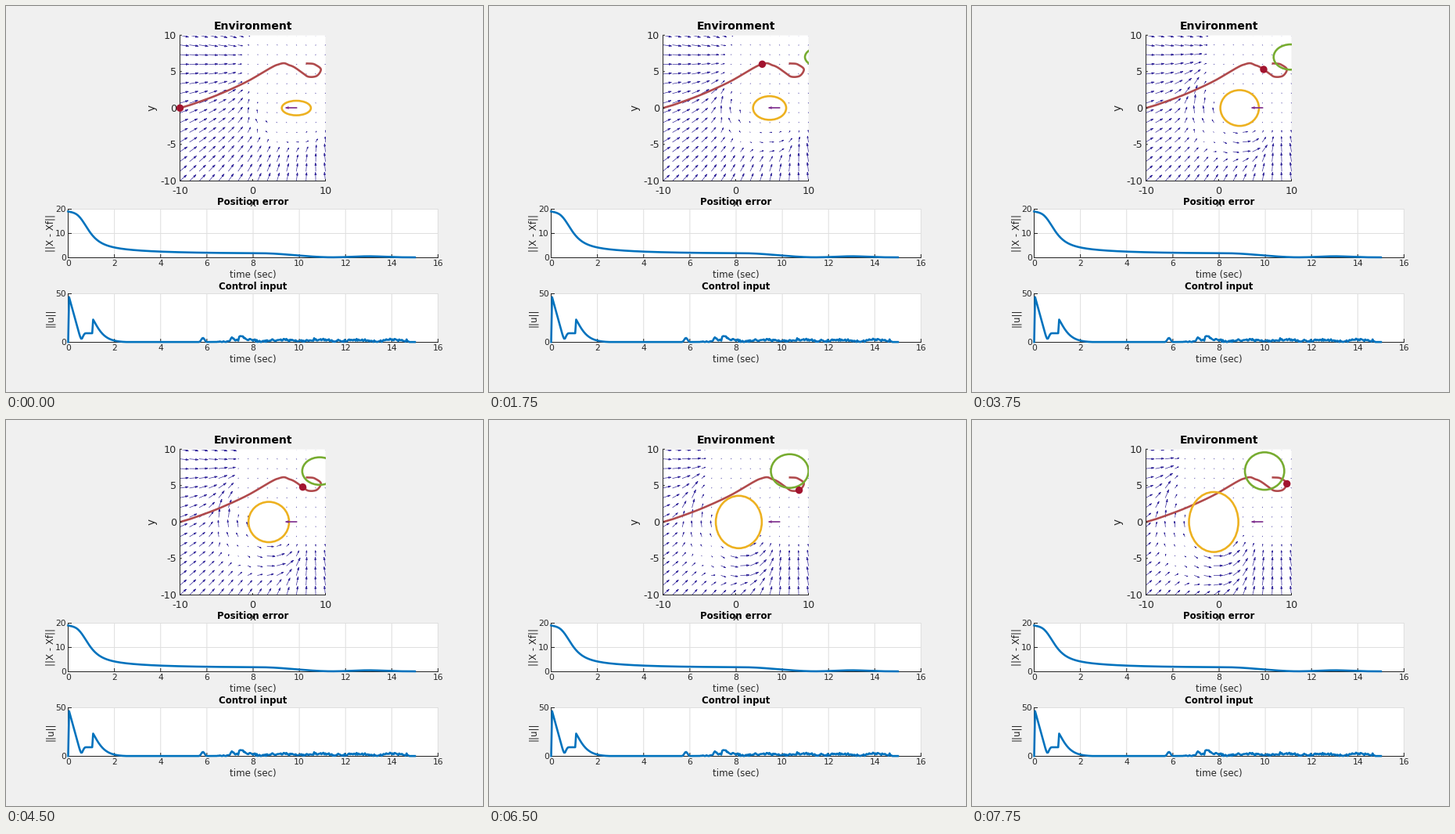
A matplotlib script for the animation above (8 s loop, 610x493 px).

```python
import matplotlib.pyplot as plt
import numpy as np
from matplotlib.animation import FuncAnimation
from matplotlib.patches import Circle, Ellipse, Rectangle

W, H, DPI = 610, 493, 64
PT = 72 / DPI
INK, GRID, BLUE, PURPLE = "#262626", "#dfdfdf", "#0072BD", "#7E2F8E"
SCALE, CX, CY = 9.3, 315.5, 130.3
GOAL = 8, 6

plt.rcParams["font.family"] = "DejaVu Sans"
fig = plt.figure(figsize=(W / DPI, H / DPI), dpi=DPI, facecolor="#f0f0f0")
ax = fig.add_axes([0, 0, 1, 1])
ax.set(xlim=(0, W), ylim=(H, 0))
ax.axis("off")


def line(x, y, color=INK, width=1.0, **kw):
    return ax.plot(x, y, color=color, lw=width * PT, snap=False, **kw)[0]


def label(x, y, text, size, ha="center", color=INK, **kw):
    ax.text(x, y, text, fontsize=size * PT, ha=ha, color=color,
            va="center" if "rotation" in kw else "center_baseline", **kw)


def title(x, y, text, size):
    label(x, y, text, size, weight="bold", color="black")


def panel(x0, y0, x1, y1):
    box = Rectangle((x0, y0), x1 - x0, y1 - y0, fc="white", ec="none",
                    zorder=0, snap=False)
    ax.add_patch(box)
    line([x0, x0, x1], [y0, y1, y1], zorder=6, solid_joinstyle="miter")
    return box


def to_px(x, y):
    return CX + SCALE * x, CY - SCALE * y


def smooth(lo, hi, v):
    s = np.clip((v - lo) / (hi - lo), 0, 1)
    return s * s * (3 - 2 * s)


def bump(t, center, width):
    return np.exp(-((t - center) / width) ** 2)


def hermite(knots, values, t):
    """Smooth curve through values at unevenly spaced knots."""
    slope = np.gradient(values, knots)
    i = np.clip(np.searchsorted(knots, t, side="right") - 1, 0, len(knots) - 2)
    h = knots[i + 1] - knots[i]
    s = (t - knots[i]) / h
    return ((1 + 2 * s) * (1 - s) ** 2 * values[i] + s * (1 - s) ** 2 * h * slope[i]
            + s * s * (3 - 2 * s) * values[i + 1] + s * s * (s - 1) * h * slope[i + 1])


# Environment panel
env = panel(222.5, 37.5, 408.5, 223.5)
title(316, 24.2, "Environment", 14)
label(315.5, 251, "x", 13.5)
label(187, 130, "y", 13.5, rotation=90)
for v in (-10, 0, 10):
    px = to_px(v, 0)[0]
    label(px, 235, str(v), 12.8)
    line([px, px], [223.5, 221.5], zorder=6)
for v in range(-10, 11, 5):
    py = to_px(0, v)[1]
    label(218, py - 0.6, str(v), 12.8, ha="right")
    line([222.5, 224.5], [py, py], zorder=6)


def chart(top, name, ylabel, ymax, yticks, t, values):
    left, right, bottom = 79.5, 552.5, top + 62
    panel(left, top, right, bottom)

    def x_at(v):
        return left + v * (right - left) / 16

    def y_at(v):
        return bottom - v * 62 / ymax

    for v in range(0, 17, 2):
        px = x_at(v)
        line([px, px], [top, bottom], GRID, zorder=1)
        line([px, px], [bottom, bottom - 4], zorder=6)
        label(px, bottom + 7, str(v), 10.7)
    for v in yticks:
        py = y_at(v)
        line([left, right], [py, py], GRID, zorder=1)
        line([left, left + 4], [py, py], zorder=6)
        label(77, py - 0.6, str(v), 10.7, ha="right")
    title(316, top - 10.5, name, 11.7)
    label(315.5, bottom + 20.3, "time (sec)", 11.7)
    label(57, top + 30.5, ylabel, 11.7, rotation=90)
    line(x_at(t), y_at(values), BLUE, 2.6, zorder=7, solid_joinstyle="round")


def position_error(t):
    fall = 13 / (1 + (t / 0.9) ** 3.5) + 4.3 * np.exp(-t / 2.2) + 1.6
    return fall * (1 - smooth(8.3, 11.5, t)) + 0.15 + 0.45 * bump(t, 13, 0.9)


def control_input(t):
    start = 50 * np.minimum(t / 0.04, 1) * np.maximum(0, 1 - t / 0.58)
    hold = 9.3 * smooth(0.48, 0.75, t) * (t < 1.06)
    late = np.maximum(t - 1.06, 0)
    second = 24 * np.exp(-(late / 0.42) ** 1.2) * (t >= 1.06)
    kicks = 4.5 * bump(t, 5.83, 0.1) + 4 * (bump(t, 7.1, 0.08) + bump(t, 7.5, 0.15))
    noise = np.random.default_rng(4).normal(0, 0.7, t.size)
    wander = 1.8 + 0.9 * np.cos(2 * np.pi * (t - 12.5) / 1.6) + noise
    ripple = wander * smooth(6, 7.5, t) * (t < 14.75)
    return np.maximum(start + hold + second + kicks + ripple, 0.3)


t = np.linspace(0, 15, 376)
chart(259.5, "Position error", "||X - Xf||", 20, (0, 10, 20), t, position_error(t))
chart(367.5, "Control input", "||u||", 50, (0, 50), t, control_input(t))

# Robot path: key points as (animation step, x, y)
ROUTE = np.array([
    (0, -10, 0), (1, -8.35, 0.5), (2, -4.7, 1.85), (3, -0.85, 3.6), (4, 2, 5.25),
    (6, 3.65, 6.02), (10, 5.05, 5.88), (17, 6.88, 4.8), (21, 7.65, 4.3),
    (25, 8.72, 4.37), (30, 9.38, 5.25), (36, 8.6, 5.95), (45, 7.45, 6.12)]).T


def robot(k):
    steps, x, y = ROUTE
    return to_px(hermite(steps, x, k), hermite(steps, y, k))


line(*robot(np.linspace(0, 45, 400)), "#b04a4c", 2.6, zorder=3).set_clip_path(env)
line([371.5, 358.5], [130, 130], PURPLE, 1.7, zorder=5)
ax.fill([357, 361.5, 361.5], [130, 128.1, 131.9], color=PURPLE, lw=0, zorder=5)

# Moving parts
arrows = line([], [], "#32269a", 0.7, zorder=2)
arrows.set_clip_path(env)
rings = []
for color in ("#EDB120", "#77AC30"):
    ring = Ellipse((0, 0), 1, 1, fc="none", ec=color, lw=2.6 * PT, zorder=4)
    ax.add_patch(ring)
    ring.set_clip_path(env)
    rings.append(ring)
dot = Circle((0, 0), 4.7, fc="#A2142F", ec="none", zorder=8)
ax.add_patch(dot)

grid = np.linspace(-10, 10, 16)
GX, GY = (g.ravel() for g in np.meshgrid(grid, grid))


def obstacles(k):
    """Centre x, centre y and the two radii of each obstacle."""
    return ((6 - 0.223 * k, 0, 2 + 0.0465 * k, 1 + 0.104 * k),
            (13 - 0.223 * k, 7, 2 + 0.0235 * k, 1 + 0.0525 * k))


def field(k):
    """Goal-seeking flow, bent around the first obstacle, in pixels."""
    ox, oy, a, b = obstacles(k)[0]
    to_goal = np.stack([GOAL[0] - GX, GOAL[1] - GY])
    dist = np.hypot(*to_goal)
    u = to_goal / dist

    # Near the obstacle the normal part fades and the tangent part grows.
    dx, dy, ra, rb = GX - ox, GY - oy, a + 4.2, b + 4.2
    reach = np.maximum((dx / ra) ** 2 + (dy / rb) ** 2, 1)
    q = reach ** -2 * (1 - smooth(0, 6, dx))
    n = np.stack([dx / ra ** 2, dy / rb ** 2])
    n /= np.hypot(*n) + 1e-9
    tangent = np.stack([-n[1], n[0]])
    v = (1 - q) * (u * n).sum(0) * n + (1 + q) * (u * tangent).sum(0) * tangent
    size = np.hypot(*v) + 1e-9

    shadow = smooth(ox - a - 3, ox - a - 1, GX) * smooth(-1, 1.5, GY)
    length = 11 * np.minimum(size, 1) * smooth(8.2, 12.5, dist) * (1 - shadow)
    outside = np.ones(GX.shape, bool)
    for ex, ey, ea, eb in obstacles(k):
        outside &= ((GX - ex) / ea) ** 2 + ((GY - ey) / eb) ** 2 > 1
    v *= np.maximum(length, 0.6) / size
    return v[0, outside], -v[1, outside], *to_px(GX[outside], GY[outside])


def arrow_strokes(k):
    vx, vy, x, y = field(k)
    tip_x, tip_y = x + vx, y + vy
    back, side = 0.28, 0.1
    base_x, base_y = tip_x - back * vx, tip_y - back * vy
    gap = np.full(x.shape, np.nan)
    xs = [x, tip_x, base_x - side * vy, base_x + side * vy, tip_x, gap]
    ys = [y, tip_y, base_y + side * vx, base_y - side * vx, tip_y, gap]
    return np.stack(xs, 1).ravel(), np.stack(ys, 1).ravel()


def update(frame):
    k = max(0, frame - 1)
    arrows.set_data(*arrow_strokes(k))
    for ring, (ex, ey, a, b) in zip(rings, obstacles(k)):
        ring.set_center(to_px(ex, ey))
        ring.width, ring.height = 2 * a * SCALE, 2 * b * SCALE
    dot.center = robot(k)
    return [arrows, *rings, dot]


anim = FuncAnimation(fig, update, frames=32, interval=250, repeat=True,
                     repeat_delay=0, blit=False)
plt.show()
```
